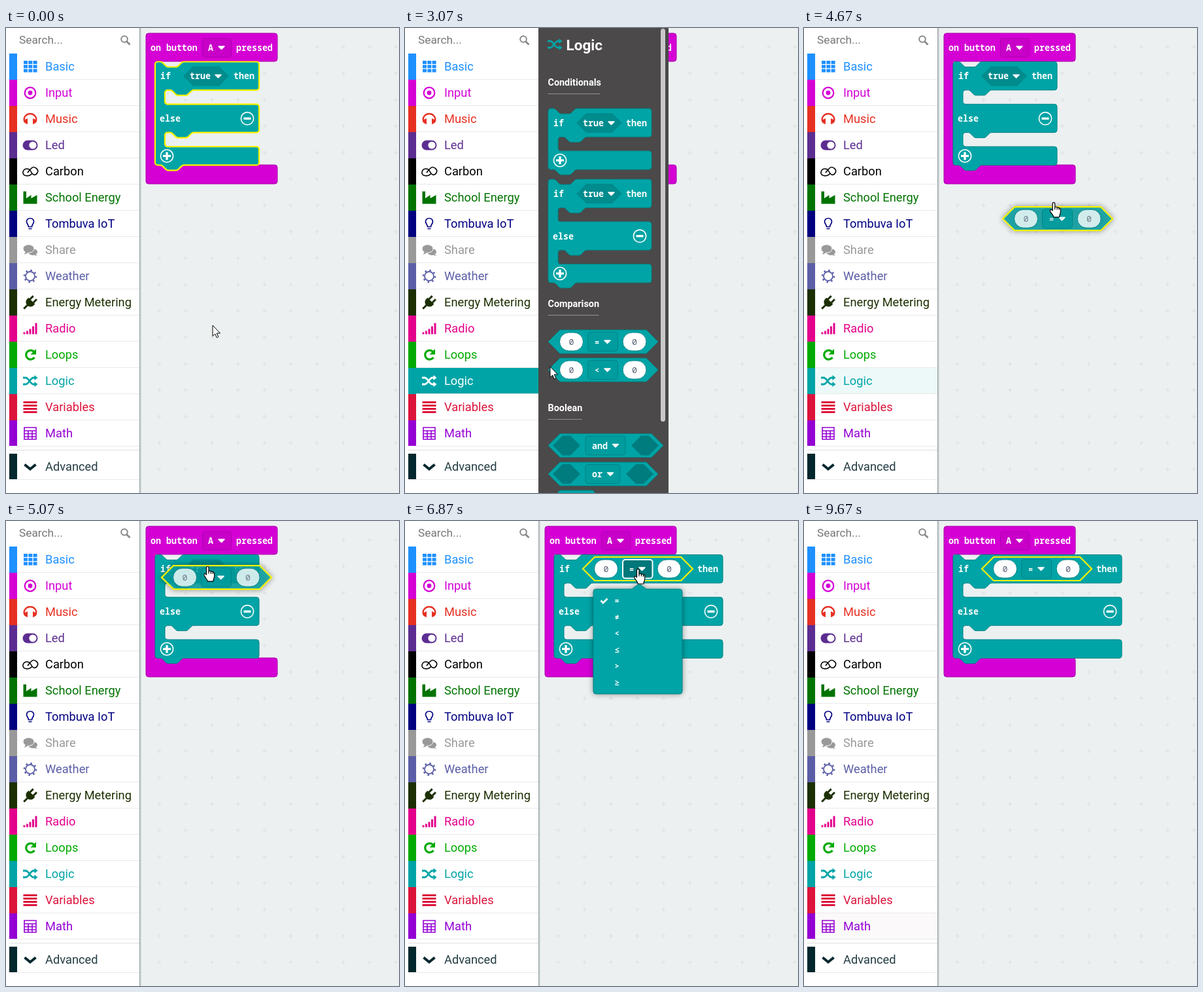
Animation of 601x710 px, one loop 9990 ms. Source, as an HTML page:

```html
<!DOCTYPE html>
<html lang="en">
<head>
<meta charset="utf-8">
<title>Block editor</title>
<style>
html, body { margin: 0; height: 100%; overflow: hidden; background: #fff; }
svg { display: block; width: 100vw; height: 100vh; }
text { font-family: Roboto, sans-serif; }
.code { font: 700 13.3px 'Noto Sans Mono', monospace; }
.digit { font-weight: 400; }
.head { font-size: 14.4px; font-weight: 600; }
.sel > path:first-child { stroke: #fff200; stroke-width: 2.2; }
.drag { fill-opacity: .8; filter: drop-shadow(0 0 4px rgba(0,0,0,.45)); }
#menu { filter: drop-shadow(0 0 4px rgba(0,0,0,.4)); }
</style>
</head>
<body>
<svg id="stage" viewBox="0 0 601 710"></svg>
<script>
const TEAL = '#00a4a6', DARK = '#008385', SLOT = '#007c7f', LOOP = 9990;
const $ = id => document.getElementById(id);

// Drawing helpers
const solid = (d, fill = 'currentColor') => `<path d="${d}" fill="${fill}"/>`;
const line = (d, width = 2, color = 'currentColor') =>
  `<path d="${d}" fill="none" stroke="${color}" stroke-width="${width}"/>`;
const box = (x, y, w, h, fill, more = '') =>
  `<rect x="${x}" y="${y}" width="${w}" height="${h}" fill="${fill}" ${more}/>`;
const at = (x, y, body, more = '') => `<g transform="translate(${x} ${y})" ${more}>${body}</g>`;
const code = (x, y, s, more = '') => `<text class="code" x="${x}" y="${y}" fill="#fff" ${more}>${s}</text>`;
const caret = (x, y) =>
  `<path d="M${x - 4.5} ${y - 2}h9l-4.5 4.5z" fill="#fff" stroke="#fff" stroke-width="1.5" stroke-linejoin="round"/>`;
const hex = (x, y, w, h, fill, stroke = 'none') =>
  `<path d="M${x} ${y + h / 2}l${h / 2}-${h / 2}h${w - h}l${h / 2} ${h / 2}-${h / 2} ${h / 2}h${h - w}z" fill="${fill}" stroke="${stroke}"/>`;
const field = (x, y, w, h, fill = '#009c9e', stroke = DARK, more = '') =>
  box(x, y, w, h, fill, `rx="4" stroke="${stroke}" ${more}`);

// Blocks
const notch = 'c2 0 3 1 4 2l4 4c1 1 2 2 4 2h12c2 0 3-1 4-2l4-4c1-1 2-2 4-2';
const notchBack = 'c-2 0-3 1-4 2l-4 4c-1 1-2 2-4 2h-12c-2 0-3-1-4-2l-4-4c-1-1-2-2-4-2';

function ifPath(w, mouths) {
  let y = 0, d = `M0 4a4 4 0 0 1 4-4h4${notch}H${w - 4}a4 4 0 0 1 4 4`;
  for (let i = 0; i < mouths; i++) {
    y += 43.3;
    d += `V${y - 4}a4 4 0 0 1-4 4H59${notchBack}h-4a4 4 0 0 0-4 4v13.5a4 4 0 0 0 4 4H${w - 4}a4 4 0 0 1 4 4`;
    y += 21.5;
  }
  return d + `V${y + 24.3}a4 4 0 0 1-4 4H44${notchBack}H4a4 4 0 0 1-4-4z`;
}

const ring = (x, y, bars) =>
  `<circle cx="${x}" cy="${y}" r="9.6" fill="none" stroke="#fff" stroke-width="1.6"/>` +
  at(x, y, line(bars, 3.4, '#fff'));

function ifBlock(x, y, w, mouths, condition, more = '') {
  return at(x, y,
    `<path d="${ifPath(w, mouths)}" fill="${TEAL}" stroke="${DARK}"/>` +
    code(8, 26.5, 'if') + code(w - 39, 26.5, 'then') +
    (condition ? hex(43, 7, 70, 30, '#008b8d') + code(53, 26.5, 'true') + caret(96.5, 22) : '') +
    (mouths > 1 ? code(7, 91.5, 'else') + ring(w - 18, 86.7, 'M-5.5 0h11') : '') +
    ring(18, mouths * 64.8 + 14.3, 'M-6 0h12M0-6v12'), more);
}

const pill = x => box(x, 4, 36, 28, '#fff', `rx="14" stroke="${DARK}"`) +
  code(x + 18, 23, '0', 'text-anchor="middle" class="code digit" style="fill:#575e75;font-weight:400"');

const compare = (x, y, op, more = '') => at(x, y,
  hex(0, 0, 168, 36, TEAL, DARK) + pill(17.5) + pill(114) +
  field(60.5, 3.5, 46, 29) + code(71, 22.5, op, 'style="font-size:12px"') + caret(90.5, 18), more);

const logicOp = (y, op, w, fw) => at(219, y,
  hex(0, 0, w, 36, TEAL, DARK) + hex(7, 3, 42, 30, SLOT) + hex(w - 49, 3, 42, 30, SLOT) +
  field(57, 3.5, fw, 29) + code(67, 23, op) + caret(57 + fw - 15, 18));

const eventBlock = `<path d="M214 12a4 4 0 0 1 4-4H411a4 4 0 0 1 4 4V47a4 4 0 0 1-4 4H228V209H411a4 4 0 0 1 4 4V234a4 4 0 0 1-4 4H218a4 4 0 0 1-4-4z" fill="#d400d4" stroke="#aa00aa"/>` +
  code(221, 35, 'on button') + field(300.5, 16, 44, 28.5, '#c800c8', '#b000b0') +
  code(309, 35, 'A') + caret(329.5, 30) + code(352, 35, 'pressed');

// Sidebar
const shuffle = line('M-11-5h4C-2-5 0 5 5 5h3M-11 5h4C-2 5 0-5 5-5h3', 2.8) + solid('M6.5-9l5 4-5 4zM6.5 1l5 4-5 4z');
const bars = (n, f) => Array.from({ length: n }, (_, i) => solid(f(i))).join('');
const rows = [
  ['Basic', '#1e90ff', bars(9, i => `M${i % 3 * 7.3 - 10} ${(i / 3 | 0) * 6.3 - 9}h6v5h-6z`)],
  ['Input', '#d400d4', '<circle r="8.3" fill="none" stroke="currentColor" stroke-width="2.2"/><circle r="3.4"/>'],
  ['Music', '#e63022', line('M-8 5C-12-2-6-8 0-8S12-2 8 5', 2.4) + solid('M-4-1v9l-4.5-2v-5zM4-1v9l4.5-2v-5z')],
  ['Led', '#5c2d91', box(-11.5, -7.5, 23, 15, 'currentColor', 'rx="7.5"') + '<circle cx="4" r="5.6" fill="#fff"/>'],
  ['Carbon', '#000', line('M3 3C-2 9-12 7-11 1S-2-6 1 0 8 7 11 2 6-9 2-5-4 2-4 2', 1.6)],
  ['School Energy', '#007300', solid('M-10.500 9.500V-9.500h4.500V1l7.500-5v5l9-5v13.500z')],
  ['Tombuva IoT', '#000080', line('M-2.5 4.500C-2.5 1-5.500 0-5.500-3.500a5.500 5 0 0 1 11 0C5.500 0 2.500 1 2.500 4.500zM-2.500 7.500h5', 1.7)],
  ['Share', '#999', '<ellipse cx="4" cy="3" rx="7" ry="5"/>' + solid('M7 5l4 4-7-2z') +
    '<ellipse cx="-2.500" cy="-2" rx="8.500" ry="6.300" stroke="#fff"/>' + solid('M-7 2l-2 5 6-3z')],
  ['Weather', '#5b5ea6', '<g fill="none" stroke="currentColor"><circle r="7" stroke-width="1.800"/><circle r="9" stroke-width="2.600" stroke-dasharray="2.500 4.570"/></g>'],
  ['Energy Metering', '#1c2f00', `<g transform="rotate(45) scale(1.150)">${solid('M-6-3H6V0a6 5.500 0 0 1-12 0zM-4.500-9h2.600v6h-2.600zM1.900-9h2.600v6H1.900zM-1.300 5h2.600v7h-2.600z')}</g>`],
  ['Radio', '#e3008c', bars(5, i => `M${i * 4.5 - 10.5} 8.5h3v${-[3, 5, 8, 12, 17][i]}h-3z`)],
  ['Loops', '#00aa00', line('M6-4.500A7 7 0 1 0 6.500 4', 3.2) + solid('M9-9v8.500h-8.500z')],
  ['Logic', TEAL, shuffle],
  ['Variables', '#dc143c', bars(4, i => `M-10.500 ${i * 5 - 9}h21v3h-21z`)],
  ['Math', '#9400d3', line('M-9-9H9V9H-9zM-9-4H9M-9 .5H9M-9 5H9M-3-4V9M3-4V9', 1.6)],
  ['Advanced', '#02272d', line('M-8.500-3.500l8.500 7 8.500-7', 4)]
];

const rowMarkup = rows.map(([name, color, icon], i) => {
  const y = i < 15 ? 39 + i * 40 : 650;
  return box(5, y, 12, i < 14 ? 40 : 39, color) + box(17, y + 39, 187, 1, '#e9e9e9') +
    `<g id="row${i}" color="${color}" fill="currentColor">` + at(37, y + 20, icon) +
    `<text x="60" y="${y + 26}" font-size="18.300"${i === 15 ? ' fill="#233c43"' : ''}>${name}</text></g>`;
}).join('');

const sidebar = box(0, 0, 204, 710, '#fff') + box(204, 0, 1.5, 710, '#98a2a5') + box(205.5, 0, 1.5, 710, '#d3d9da') +
  '<text x="20" y="24" font-size="17.300" fill="#777">Search...</text>' +
  at(181, 17, '<circle r="4.800" fill="none" stroke="#888" stroke-width="2"/>' + line('M3.500 3.500l5 5', 2.6, '#888')) +
  box(17, 0, 187, 39, '#fbf9f9', 'id="hover0"') + box(17, 0, 187, 39, '#fbf9f9', 'id="hover1"') +
  box(17, 519, 187, 39, TEAL, 'id="active"') + rowMarkup + box(5, 644, 199, 1, '#ddd');

// Flyout
const heading = (y, s, w) => `<text class="head" x="218.500" y="${y}" fill="#fff">${s}</text>` +
  `<path d="M219 ${y + 12.5}h${w}" stroke="#ddd" stroke-dasharray="1 1"/>`;
const flyout = box(204, 0, 199, 710, '#4b4949') + at(229, 25, shuffle, `color="${TEAL}"`) +
  '<text x="246.500" y="34" font-size="22.500" font-weight="600" fill="#fff">Logic</text>' +
  heading(88, 'Conditionals', 80) + ifBlock(219, 123, 158, 1, true) + ifBlock(219, 231, 158, 2, true) +
  heading(426, 'Comparison', 78) + compare(219, 461, '=', 'id="pick"') + compare(219, 504, '&lt;') +
  heading(585, 'Boolean', 52) + logicOp(619.5, 'and', 176, 61) + logicOp(663, 'or', 168, 53) +
  hex(219, 706, 86, 36, TEAL, DARK) + box(391, 1, 7, 600, '#c9c9c9', 'rx="3.500"');

// Operator menu
const menu = `<path d="M292 104H347L358 95.500 369 104H420a4 4 0 0 1 4 4V260a4 4 0 0 1-4 4H292a4 4 0 0 1-4-4V108a4 4 0 0 1 4-4z" fill="${TEAL}" stroke="${DARK}"/>` +
  line('M299.500 121.500l3.500 3.500 6.500-6.500', 2.8, '#fff') +
  ['=', '≠', '&lt;', '≤', '&gt;', '≥'].map((s, i) => code(320.5, 126 + i * 25, s, 'style="font-size:12px"')).join('');

const cursors = '<g id="arrow" fill="#fff" stroke="#000"><path d="M0 0V16.500L3.800 13 6.300 18.800 8.800 17.700 6.300 12H11.500z"/></g>' +
  '<g id="hand" fill="#fff" stroke="#000" stroke-width="1.200" stroke-linejoin="round"><path d="M-1.500 13V2.200a1.700 1.700 0 0 1 3.500 0V8c.6-1.200 3-1.200 3.400.6 .8-1 2.600-.8 3 .8 1-.7 2.300 0 2.300 1.600V15c0 3-1.600 4-1.800 8H.2C0 20-3.400 17.500-5.100 13.800-6 11.500-3.200 10.500-1.500 13z"/><path d="M2 8v3.500M5.400 8.600v3M8.400 9.400v2.500" fill="none"/></g>';

$('stage').innerHTML =
  '<defs><pattern id="grid" x="214" y="250.400" width="40.200" height="40.300" patternUnits="userSpaceOnUse"><path d="M17.500 20.500h6M20.500 17.500v6" stroke="#dadedf"/></pattern></defs>' +
  box(204, 0, 397, 710, '#ecf0f1') + box(204, 0, 397, 710, 'url(#grid)') + eventBlock +
  ifBlock(228, 51.5, 159, 2, true, 'id="narrow"') + ifBlock(228, 51.5, 258, 2, false, 'id="wide"') +
  compare(0, 0, '=', 'id="test"') +
  `<g id="focus">${field(333, 59, 45.500, 28.500, '#00777a', '#fff', 'stroke-width="2"') + code(343, 77.5, '=', 'style="font-size:12px"') + caret(362.5, 73)}</g>` +
  `<g id="menu">${menu}</g>` + sidebar + `<g id="flyout">${flyout}</g>` + cursors;

// Pointer path: time, x, y
const path = [
  [0, 316, 454], [870, 316, 454], [1500, 236, 480], [1867, 166, 521], [1933, 161, 525], [2200, 160, 528],
  [2800, 178, 539], [3067, 222, 517], [3600, 301, 488], [3970, 301, 488], [4133, 328, 494], [4200, 328, 494],
  [4600, 385, 300], [5000, 319, 95], [5067, 308, 69], [5133, 308, 66], [5350, 308, 66], [6330, 352, 75],
  [6867, 356, 73], [7330, 362, 115], [7467, 363, 116], [7700, 363, 116], [8000, 354, 112], [9210, 354, 112],
  [9667, 150, 735], [LOOP, 150, 735]
];

const rate = (i, c) => (path[i + 1][c] - path[i][c]) / (path[i + 1][0] - path[i][0]);
function slope(i, c) {
  if (i === 0 || i === path.length - 1) return 0;
  const a = rate(i - 1, c), b = rate(i, c);
  return a * b > 0 ? 2 * a * b / (a + b) : 0;
}

// Monotone cubic through the path points
function pointer(t) {
  const i = Math.max(0, path.findIndex(k => k[0] > t) - 1);
  const [t0] = path[i], h = path[i + 1][0] - t0, u = (Math.max(t, 0) - t0) / h, v = 1 - u;
  return [1, 2].map(c =>
    path[i][c] * (1 + 2 * u) * v * v + path[i + 1][c] * u * u * (3 - 2 * u) +
    h * u * v * (slope(i, c) * v - slope(i + 1, c) * u));
}

const clamp = v => Math.min(1, Math.max(0, v));
const show = (id, on) => { $(id).style.display = on ? '' : 'none'; };
const move = (id, x, y) => $(id).setAttribute('transform', `translate(${x} ${y})`);

function hover(id, [x, y]) {
  const row = Math.floor((y - 39) / 40);
  show(id, x < 204 && row >= 0 && row < 15);
  $(id).setAttribute('y', 39 + row * 40);
}

function draw(now) {
  const t = Math.floor((now % LOOP + 4) * .015) / .015; // 15 steps a second
  const [x, y] = pointer(t);
  const open = t > 2320 && t < 4060, dragging = t > 4060 && t < 5395, dropped = t >= 5395;

  const hand = x < 204 || (t > 3300 && t < 7800);
  show('hand', hand);
  show('arrow', !hand);
  move(hand ? 'hand' : 'arrow', x, y);
  hover('hover0', pointer(t));
  hover('hover1', pointer(t - 133));

  show('flyout', open);
  $('pick').classList.toggle('sel', t > 3400);
  $('row12').setAttribute('color', open ? '#fff' : TEAL);
  $('active').setAttribute('opacity', open ? 1 : t < 4060 ? 0 : clamp((4700 - t) / 480));

  show('narrow', !dropped);
  show('wide', dropped);
  $('narrow').classList.toggle('sel', t < 2320);

  // The dragged block trails the pointer by one step
  const [bx, by] = pointer(t - 67);
  show('test', dragging || dropped);
  $('test').setAttribute('class', dragging ? 'sel drag' : 'sel');
  move('test', dropped ? 272 : bx - 81, dropped ? 55 : by - 27);

  const shown = clamp((t - 6500) / 250) * clamp((7980 - t) / 250);
  show('focus', t > 6500 && t < 7760);
  show('menu', shown > 0);
  $('menu').setAttribute('opacity', shown);
  move('menu', 0, -8 * (1 - shown));
}

function tick() {
  draw(performance.now());
  requestAnimationFrame(tick);
}
tick();
</script>
</body>
</html>
```
